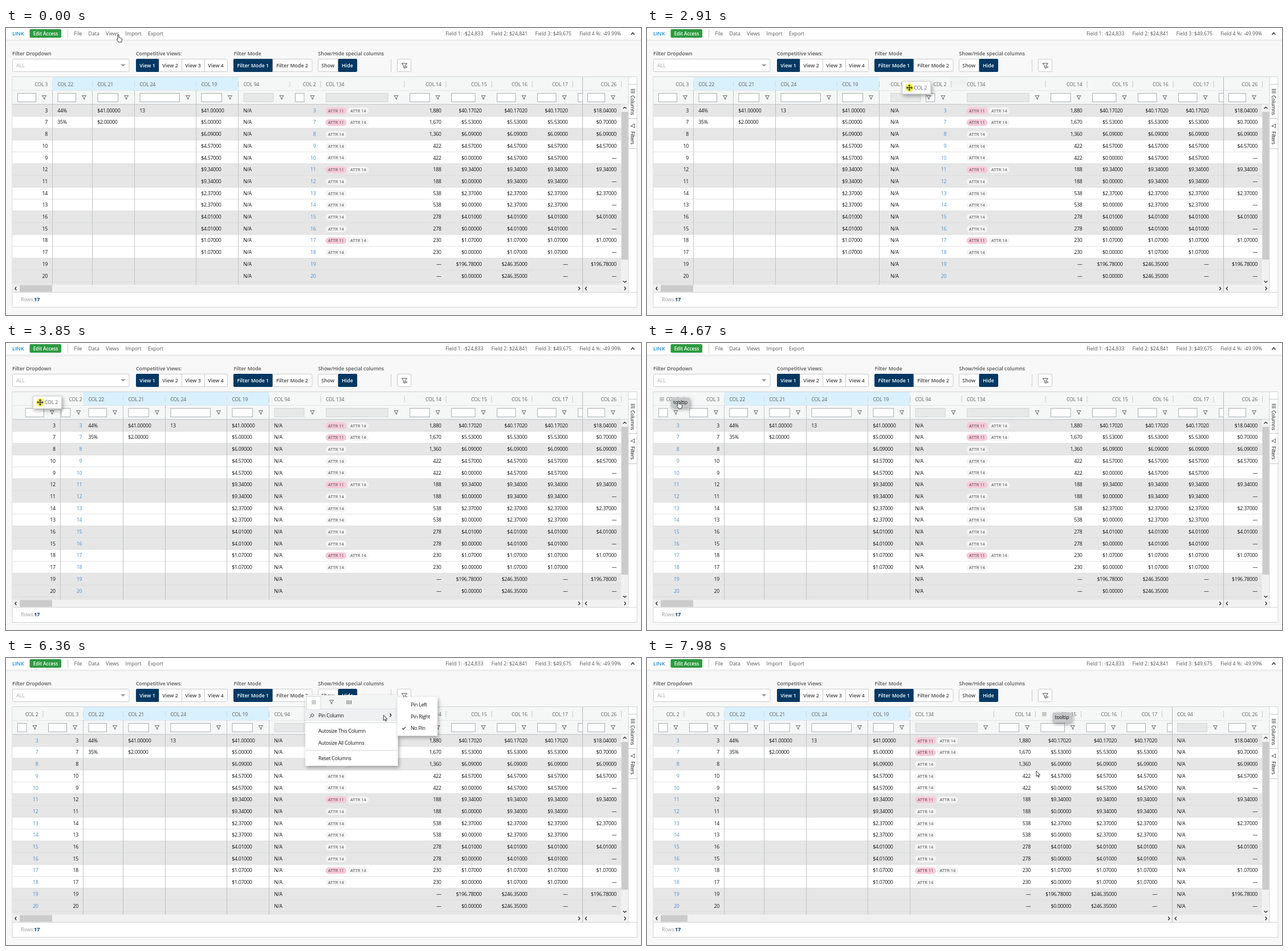
An HTML page that plays this animation: 1114 px wide and 503 px high, repeating every 8 s.

```html
<!DOCTYPE html>
<html lang="en">
<head>
<meta charset="utf-8">
<title>Column grid</title>
<style>
html, body { margin: 0; width: 100%; height: 100%; overflow: hidden; background: #f8f8f8; }
svg { display: block; width: 1114px; height: 503px; }
text { font: 8.8px "Open Sans", "Noto Sans", sans-serif; fill: #555; white-space: pre; }
.b { font-weight: 600; }
.g { letter-spacing: -.03em; fill: #141414; }
.h { fill: #626262; }
.link { fill: #4d8fcc; }
.pill { font-size: 7.5px; fill: #484848; }
.shade { filter: drop-shadow(2px 3px 3px #0005); }
</style>
</head>
<body>
<svg id="stage" viewBox="0 0 1114 503"></svg>
<script>
const LOOP = 8000, NAVY = '#003862', LINE = '#cfd2d4';
const stage = document.getElementById('stage');

function el(tag, attrs, parent = stage, content) {
  const node = document.createElementNS('http://www.w3.org/2000/svg', tag);
  for (const key in attrs) node.setAttribute(key, attrs[key]);
  if (content !== undefined) node.textContent = content;
  return parent.appendChild(node);
}
const group = (parent, attrs = {}) => el('g', attrs, parent);
const rect = (x, y, width, height, fill, parent, more) =>
  el('rect', { x, y, width, height, fill, ...more }, parent);
const path = (d, stroke, parent, more) =>
  el('path', { d, stroke, fill: 'none', ...more }, parent);
// y is the vertical middle of the capitals
const text = (s, x, y, cls, parent, more) =>
  el('text', { x, y: y + 3.1, class: cls, ...more }, parent, s);
const at = (node, x, y = 0) => node.setAttribute('transform', `translate(${x} ${y})`);
const show = (node, on) => node.setAttribute('visibility', on ? 'visible' : 'hidden');
const END = { 'text-anchor': 'end' }, MID = { 'text-anchor': 'middle' };

const funnel = (x, y, parent) =>
  path(`M${x - 3.6} ${y - 3}h7.2l-2.7 3.4v3l-1.8 -1v-2z`, '#444', parent, { 'stroke-width': .8 });
const burger = (x, y, parent) =>
  path(`M${x - 3.8} ${y - 2.5}h7.6m-7.6 2.5h7.6m-7.6 2.5h7.6`, '#666', parent, { 'stroke-width': .8 });
const chevron = (x, y, dx, dy, parent) => path(
  dx ? `M${x - dx} ${y - 3}l${2 * dx} 3l${-2 * dx} 3` : `M${x - 3} ${y - dy}l3 ${2 * dy}l3 ${-2 * dy}`,
  '#333', parent, { 'stroke-width': 1.4 });
const moveIcon = (x, y, parent) => path(
  `M${x - 4.5} ${y}h9M${x} ${y - 4.5}v9` +
  `M${x - 1.7} ${y - 3}l1.7 -1.8l1.7 1.8M${x - 1.7} ${y + 3}l1.7 1.8l1.7 -1.8` +
  `M${x - 3} ${y - 1.7}l-1.8 1.7l1.8 1.7M${x + 3} ${y - 1.7}l1.8 1.7l-1.8 1.7`,
  '#333', parent, { 'stroke-width': 1.1 });

// Top bar
rect(0, 0, 1114, 21, '#fff');
rect(0, 20.5, 1114, 1, '#dedede');
rect(0, 21.5, 1114, 2, '#f0f0f0');
const viewsHover = rect(172, 3, 30, 13, '#e8e8e8', stage, { rx: 2 });
text('LINK', 11, 10.3, 'b', stage, { style: 'fill:#1486dc;font-size:9px' });
rect(41.5, 2, 55.5, 15, '#2e9a41', stage, { rx: 2 });
text('Edit Access', 69.5, 9.5, 'b', stage, { ...MID, style: 'fill:#fff;font-size:8.2px' });
path('M108.5 2V17', '#ccc');
[['File', 119.5], ['Data', 144.5], ['Views', 175], ['Import', 209.5], ['Export', 249]]
  .forEach(([s, x]) => text(s, x, 10));
[['Field 1: -$24,833', 771], ['Field 2: $24,841', 851.5], ['Field 3: $49,675', 928.5], ['Field 4 %: -49.99%', 1006]]
  .forEach(([s, x]) => text(s, x, 10));
chevron(1099.5, 10, 0, -1.8);

// Controls
[['Filter Dropdown', 11], ['Competitive Views:', 228], ['Filter Mode', 399.5], ['Show/Hide special columns', 547.5]]
  .forEach(([s, x]) => text(s, x, 44.5, 'b'));
const BOX = { stroke: '#c9c9c9', rx: 2 };
rect(11.5, 54.5, 204.5, 22, '#fff', stage, BOX);
text('ALL', 18, 65.5, '', stage, { style: 'fill:#aaa' });
path('M201 63.5h8.5l-4.2 4z', 'none', stage, { style: 'fill:#999' });

function segments(edges, labels, active) {
  const x = edges[0], width = edges.at(-1) - x;
  rect(x + .5, 54.5, width, 22, '#fff', stage, BOX);
  labels.forEach((s, i) => {
    const on = i === active, left = edges[i], right = edges[i + 1];
    if (on) rect(left, 54, right - left + .5, 23, NAVY, stage, { rx: 2 });
    else if (i) path(`M${left + .5} 54.5v22`, '#c9c9c9');
    text(s, (left + right) / 2, 65.7, 'b', stage, { ...MID, style: `fill:${on ? '#fff' : '#444'}` });
  });
}
segments([228, 268, 308, 348, 388], ['View 1', 'View 2', 'View 3', 'View 4'], 0);
segments([399, 467.5, 536.5], ['Filter Mode 1', 'Filter Mode 2'], 0);
segments([547, 582.5, 615.5], ['Show', 'Hide'], 1);
path('M675.5 55V77', '#ccc');
rect(686.5, 54.5, 24, 22, '#fff', stage, BOX);
path('M694 62h9.5l-3.6 4.2v4.5l-2.4 -1.5v-3z', '#444');
path('M701 67l3 3m0 -3l-3 3', '#444');

// Grid frame
const TOP = 134.3, ROW = 20.7, rowY = i => TOP + ROW * (i + .5);
rect(11, 85.5, 1096, 404, '#fff', stage, { stroke: LINE });
rect(11.5, 86, 1080, 48, '#f5f7f7');
[...'1010011001100111'].forEach((dark, i) => {
  const y = TOP + ROW * i, h = Math.min(ROW, 450 - y);
  rect(11.5, y, 1068, h, dark === '1' ? '#e6e6e6' : '#fff');
  path(`M11.5 ${y}H1079`, '#d8dadb', stage, { 'stroke-width': .8 });
});
path('M11.5 109.5H1079', '#e2e4e5');
path('M11.5 133.8H1091', '#c4c7c9');

// Column data
const dollars = v => v === '-' ? '—' : '$' + (+v).toFixed(5);
const money = list => list.map(dollars);
const unit = '6.09 4.57 4.57 9.34 9.34 2.37 2.37 4.01 4.01 1.07 1.07'.split(' ');
const alternate = fill => unit.map((v, i) => i && i % 2 === 0 ? fill : v);
const words = s => s.split(' ');
const specs = {
  2: { x: 498, w: 54, right: true, cls: 'g link', rows: words('3 7 8 9 10 11 12 13 14 15 16 17 18 19 20') },
  3: { x: 11, w: 70.5, right: true, rule: true, rows: words('3 7 8 10 9 12 11 14 13 16 15 18 17 19 20') },
  22: { x: 81.5, w: 70, blue: true, rule: true, rows: ['44%', '35%'] },
  21: { x: 151.5, w: 74, blue: true, rule: true, rows: money([41, 2]) },
  24: { x: 225.5, w: 108, blue: true, rule: true, rows: ['13'] },
  19: { x: 333.5, w: 74, blue: true, rule: true, rows: money([41, 5, ...unit]) },
  94: { x: 407.5, w: 90.5, locked: true, rows: Array(15).fill('N/A') },
  134: { x: 552, w: 147, locked: true, rows: [], tags: 13 },
  14: { x: 699, w: 73, right: true, rows: words('1,880 1,670 1,360 422 422 188 188 538 538 278 278 230 230 — —') },
  15: { x: 772, w: 80, right: true, pad: 17.5, rows: money([40.1702, 5.53, ...alternate(0), 196.78, 0]) },
  16: { x: 852, w: 71, right: true, rows: money([40.1702, 5.53, ...unit, 246.35, 246.35]) },
  17: { x: 923, w: 71, right: true, rows: money([40.1702, 5.53, ...unit, '-', '-']) },
  18: { x: 994, w: 71, right: true, rows: [] },
  26: { x: 1011, w: 68.5, right: true, rows: money([18.04, .7, ...alternate('-'), 196.78, '-']) }
};

function pill(s, x, y, fill, parent) {
  rect(x, y - 5.3, 37, 11.4, fill, parent, { rx: 5.7 });
  text(s, x + 18.5, y - .1, 'pill', parent, MID);
}

function column(name, parent) {
  const { x, w, right, rule, blue, locked, tags, cls = 'g', pad = 8.5, rows } = specs[name];
  const g = group(parent);
  at(g, x);
  if (blue) rect(0, 86, w, 23, '#d9f0fd', g);
  path(`M${w} 93V104`, '#c4c9cc', g);
  if (rule) path(`M${w} 109V450`, '#bec1c3', g);
  text('COL ' + name, right ? w - 8.5 : 9, 98.6, 'g h', g, right ? END : {});
  rect(9.5, 114.5, w - 38.5, 15, locked ? '#e6e7e7' : '#fff', g, { stroke: locked ? '#d3d5d6' : '#a9adb0' });
  funnel(w - 14.5, 121.6, g);
  rows.forEach((s, i) => text(s, right ? w - pad : 8.7, rowY(i), cls, g, right ? END : {}));
  for (let i = 0; i < tags; i++) {
    const pink = [0, 1, 5, 11].includes(i);
    if (pink) pill('ATTR 11', 8.5, rowY(i), '#f8c9d8', g);
    pill('ATTR 14', pink ? 47.5 : 8.5, rowY(i), '#f4f4f4', g);
  }
  return g;
}

const clip = rect(11, 86, 1000, 364, '#000', el('clipPath', { id: 'center' }, el('defs', {})));
const center = group(stage, { 'clip-path': 'url(#center)' });
const cols = {};
for (const name of [2, 3, 22, 21, 24, 19, 94, 134, 14, 15, 16, 17, 18]) cols[name] = column(name, center);
column(26);
const pinned94 = column(94);
at(pinned94, 921);

// Scrollbars, side tabs and footer
rect(11.5, 450, 1080, 13, '#f1f1f1');
const thumb = rect(24, 450.5, 57, 12, '#cbcbcb');
chevron(17, 456.5, -1.2, 0);
chevron(1086, 456.5, 1.2, 0);
const seam = group(stage);
path('M0 86V463', '#b4b8ba', seam);
chevron(-6, 456.5, 1.2, 0, seam);
chevron(6, 456.5, -1.2, 0, seam);
rect(1079.5, 134.3, 12, 316, '#f1f1f1');
rect(1079.5, 147, 12, 259, '#cbcbcb');
chevron(1085.5, 140, 0, -1.3);
chevron(1085.5, 444.5, 0, 1.3);
path('M11.5 463.3H1107', LINE);
path('M1092 86V463', LINE);
path('M1092 98.5h15M1092 158.5h15M1092 211.5h15', '#c4c7c9');
path('M1096 107.5h7.5m-7.5 3h7.5m-7.5 3h7.5', '#333');
funnel(0, 0, group(stage, { transform: 'translate(1099.5 171.5) rotate(90)' }));
for (const [s, y] of [['Columns', 118], ['Filters', 181]])
  el('text', { class: 'g', transform: `translate(1096.3 ${y}) rotate(90)` }, stage, s);
text('Rows:', 26, 476.3, '', stage, { style: 'fill:#999' });
text('17', 49.3, 476.3, 'b', stage, { style: `fill:${NAVY};font-weight:700` });

// Overlays
const panel = (x, y, w, h, parent) => rect(x, y, w, h, '#fff', parent, { class: 'shade' });
const hoverIcon = group(stage);
burger(0, 98.5, hoverIcon);

const viewsMenu = group(stage);
panel(166, 22, 150, 142, viewsMenu);
for (let i = 0; i < 4; i++) text('View ' + (i + 1), 178, 42 + i * 34, '', viewsMenu);

const tip = group(stage);
rect(0, 0, 33, 17.5, '#c5c8c9', tip, { rx: 2, class: 'shade' });
text('tooltip', 16.5, 8.8, 'g', tip, MID);

const ghost = group(stage);
rect(0, 0, 50, 22, '#fff', ghost, { stroke: '#ccc', class: 'shade' });
moveIcon(12, 11, ghost);
text('COL 2', 20.5, 11, 'g h', ghost);

const menu = group(stage);
panel(525, 65, 162.5, 124, menu);
rect(525, 65, 162.5, 24.5, '#f3f5f5', menu);
path('M525 89.5H687.5', '#d5d8d9', menu);
rect(527.5, 67.5, 24.5, 22.5, '#fff', menu, { stroke: '#d5d8d9' });
burger(540, 77.5, menu);
funnel(571, 77, menu);
path('M598 74v7m2.5 -7v7m2.5 -7v7m2.5 -7v7', '#555', menu, { 'stroke-width': .9 });
rect(525, 90.5, 162.5, 20.5, '#eef0f1', menu);
path('M532.5 104.8l3 -3m-1.6 -2.2l4 4m-3 -3.4l2.5 -3l3.2 3.2l-3 2.5', '#333', menu);
chevron(674.5, 100.3, 1.2, 0, menu);
path('M525 113.5H687.5M525 162H687.5', '#d0d3d4', menu);
[['Pin Column', 100.6], ['Autosize This Column', 128], ['Autosize All Columns', 148.6], ['Reset Columns', 175.8]]
  .forEach(([s, y]) => text(s, 548, y, 'g', menu));

const submenu = group(stage);
panel(686.5, 68.5, 70.5, 68, submenu);
const pinHover = rect(686.5, 92.5, 70.5, 20.5, '#ebeeef', submenu);
['Pin Left', 'Pin Right', 'No Pin'].forEach((s, i) => text(s, 710, 82 + i * 20.6, 'g', submenu));
path('M695 123l2 2.2l4 -4.4', '#333', submenu, { 'stroke-width': 1.2 });

const cursor = group(stage);
const INK = { fill: '#fff', 'stroke-width': .9, 'stroke-linejoin': 'round' };
const shapes = {
  arrow: path('M0 0V9.5L2.2 7.5 3.7 11 5.2 10.3 3.7 7H6.6Z', '#222', cursor, INK),
  hand: path('M-1 8V1a1.1 1.1 0 0 1 2.2 0V5l1-.3 1.2.6 1 0 1.2.8.8.6V9.5l-1 3.5H.8L-2.6 8.6c-.4-1 .6-1.6 1.6-.6Z', '#222', cursor, INK),
  move: group(cursor)
};
el('circle', { r: 7.5, fill: '#f2ea2c', opacity: .75 }, shapes.move);
moveIcon(0, 0, shapes.move);

// Motion: [time, value...], straight lines between
function track(keys, t, i = 1) {
  const n = keys.findIndex(k => k[0] > t);
  if (n === 0) return keys[0][i];
  if (n < 0) return keys.at(-1)[i];
  const a = keys[n - 1], b = keys[n];
  return a[i] + (b[i] - a[i]) * (t - a[0]) / (b[0] - a[0]);
}

const PIN = 7390;
const cursorKeys = [
  [0, 197, 12, 'hand'], [70, 197, 12, 'hand'], [200, 194, 16, 'hand'], [340, 195, 12, 'hand'],
  [1680, 195, 17, 'arrow'], [2440, 523, 81, 'arrow'], [2500, 524, 86, 'arrow'],
  [2570, 530, 95, 'hand'], [2700, 527, 104, 'move'], [3300, 327, 106, 'move'],
  [3370, 280, 105, 'move'], [3506, 109, 104, 'move'], [3950, 45, 104, 'move'],
  [4050, 55, 102, 'hand'], [4670, 55, 102, 'hand'], [4740, 85, 106, 'arrow'],
  [5290, 515, 95, 'hand'], [5430, 538, 97, 'hand'], [5500, 540, 99, 'arrow'],
  [5766, 555, 122, 'arrow'], [6300, 662, 100, 'arrow'], [6730, 664, 100, 'arrow'],
  [6860, 690, 101, 'hand'], [7040, 711, 101, 'hand'], [7460, 711, 101, 'hand'],
  [7610, 711, 104, 'arrow'], [7980, 683, 198, 'arrow']
];
const slides = {
  2: [[2860, 498], [3060, 407.5], [3370, 407.5], [3506, 355], [3660, 225], [3950, 11]],
  94: [[2860, 407.5], [3060, 461.5]],
  19: [[3370, 333.5], [3506, 383.7], [3575, 387.5]],
  24: [[3570, 225.5], [3710, 279.5]],
  21: [[3640, 151.5], [3780, 205.5]],
  22: [[3700, 81.5], [3840, 135.5]],
  3: [[3800, 11], [3980, 65]]
};
for (const name of [134, 14, 15, 16, 17, 18]) {
  const { x } = specs[name];
  slides[name] = [[PIN, x], [PIN + 200, x - 90.5]];
}
const during = (list, t) => list.find(([a, b]) => t >= a && t < b);
const hovers = [[2500, 2700, 513], [4400, 4800, 26], [5220, PIN, 538], [7450, LOOP, 697]];
const tips = [
  [2600, 2740, 531, 86, 1], [2740, 3800, 531, 86, .05], [4460, 4800, 42, 95.5, 1],
  [5290, 5440, 502, 91.5, 1], [5440, 6100, 502, 91.5, .13], [7520, LOOP, 711.5, 95.5, 1]
];

// Movement comes in bursts of even steps with rests between
const bursts = [[70, 340, 5], [1680, 2440, 12], [2500, 3300, 13], [3370, 4050, 11], [4400, 4530, 3],
  [4670, 5430, 12], [5500, 6300, 13], [6360, 6430, 2], [6730, 7040, 6], [7180, 7980, 12]];
function snap(t) {
  const burst = bursts.find(([a, b]) => t >= a && t < b);
  if (!burst) return t;
  const [a, b, steps] = burst, d = (b - a) / (steps - 1);
  return a + Math.floor((t - a) / d + .001) * d;
}

function draw(now) {
  const t = snap(now), pinned = t >= PIN;

  for (const name in slides) at(cols[name], track(slides[name], t));
  show(cols[94], !pinned);
  show(pinned94, pinned);
  const edge = pinned ? 921 : 1011;
  clip.setAttribute('width', edge - 11);
  thumb.setAttribute('width', pinned ? 47 : 57);
  at(seam, edge + .5);

  show(viewsHover, t >= 540 && t < 1740);
  show(viewsMenu, t >= 540 && t < 1350);
  show(menu, t >= 5400 && !pinned);
  show(submenu, t >= 5630 && t < 6000 || t >= 6360 && !pinned);
  pinHover.setAttribute('opacity', t >= 6850 ? 1 : 0);

  const hover = during(hovers, t), note = during(tips, t);
  show(hoverIcon, hover);
  if (hover) at(hoverIcon, hover[2]);
  show(tip, note);
  if (note) {
    at(tip, note[2], note[3]);
    tip.setAttribute('opacity', note[4]);
  }

  const x = track(cursorKeys, t, 1), y = track(cursorKeys, t, 2);
  const kind = cursorKeys.findLast(k => k[0] <= t)[3];
  at(cursor, x, y);
  for (const name in shapes) show(shapes[name], name === kind);
  show(ghost, t >= 2760 && t < 4050);
  const lagging = t >= 3300 && t < 3570;
  at(ghost, lagging ? 314.5 : x - 12.5, lagging ? 95 : y - 11);
}

const start = performance.now();
function tick() {
  draw((performance.now() - start) % LOOP);
  requestAnimationFrame(tick);
}
tick();
</script>
</body>
</html>
```
